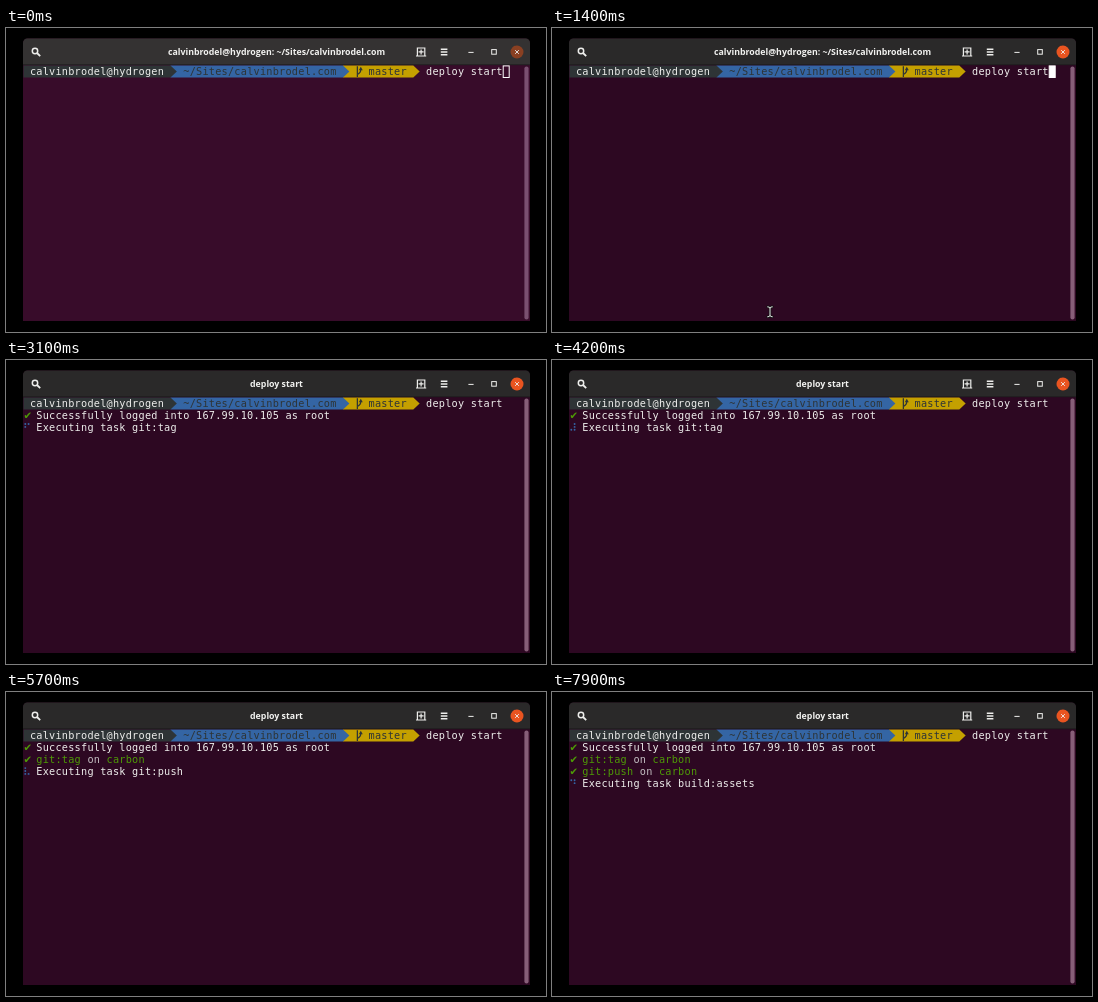
These frames come from a looping animation (540 px wide and 304 px high, 8000 ms). An HTML page:

```html
<!DOCTYPE html>
<html lang="en">
<head>
<meta charset="utf-8">
<title>Deploy terminal</title>
<style>
  html, body { margin: 0; width: 100%; height: 100%; overflow: hidden; background: #000; }
  svg { display: block; width: 100vw; height: 100vh; }
  .mono { font: 10.22px "DejaVu Sans Mono", monospace; letter-spacing: .237px; white-space: pre; }
  .title { font: bold 8.8px "Open Sans", "Noto Sans", sans-serif; text-anchor: middle; fill: #f2f2f0; }
  .icon { fill: none; stroke: #eeeeec; stroke-width: 1.2; }
</style>
</head>
<body>
<svg id="stage" viewBox="0 0 540 304">
  <defs>
    <clipPath id="frame"><path d="M17 293V15a4.5 4.5 0 0 1 4.5-4.5h498a4.5 4.5 0 0 1 4.5 4.5V293Z"/></clipPath>
  </defs>
  <rect width="540" height="304"/>
  <g clip-path="url(#frame)">
    <rect id="back" x="17" y="10" width="507" height="283"/>
    <rect id="head" x="17" y="10" width="507" height="27"/>
    <rect x="17" y="36.4" width="507" height=".8" fill="#1c1a1b"/>
    <rect id="bar" x="518.4" y="38.5" width="4.2" height="253" rx="2.1"/>
    <text id="title" class="title" x="270.5" y="27.1"></text>
    <g class="icon">
      <circle cx="29" cy="23" r="2.7" stroke-width="1.5"/>
      <path d="M31 25l3.2 3.2" stroke-width="1.8"/>
      <path d="M411.4 27.6V20h7.4v7.6M410 28h10.2M415.1 21.4v5M412.6 23.9h5"/>
      <path d="M434.8 21.2h6.6M434.8 24h6.6M434.8 26.8h6.6" stroke-width="1.4"/>
      <path d="M462.4 24.4h5.2" stroke-width="1"/>
      <rect x="485.7" y="21.6" width="4.6" height="4.6" stroke-width="1"/>
    </g>
    <circle id="close" cx="511" cy="24" r="6.5"/>
    <path class="icon" d="M509.1 22.1l3.8 3.8m0-3.8l-3.8 3.8" style="stroke-width:.9"/>
    <g id="prompt"></g>
    <rect id="cursor" x="497.2" y="37.9" width="6" height="11.6" stroke="#fff"/>
    <g id="log"></g>
    <g id="mouse" fill="none" stroke-linecap="round">
      <path id="beam" d="M-2.3-5Q0-5 0-3.6Q0-5 2.3-5M0-3.6V3.6M-2.3 5Q0 5 0 3.6Q0 5 2.3 5" stroke="#111" stroke-width="2.6"/>
      <path d="M-2.3-5Q0-5 0-3.6Q0-5 2.3-5M0-3.6V3.6M-2.3 5Q0 5 0 3.6Q0 5 2.3 5" stroke="#e8e8e8" stroke-width="1"/>
    </g>
  </g>
</svg>
<script>
const LOOP = 8000, STEP = 100;
const LEFT = 17.5, TOP = 37.4, CW = 6.39, RH = 12.14;
const DARK = '#2e3436', BLUE = '#3465a4', GOLD = '#c4a000', GREEN = '#4e9a06', WHITE = '#eeeeec', GREY = '#c3bfc2';
const USER = 'calvinbrodel';
const HOME = `${USER}@hydrogen`, SITE = `~/Sites/${USER}.com`;
const FOCUS = 1300, ENTER = 2500;
const TASKS = [
  { name: 'git:tag', at: 3060 },
  { name: 'git:push', at: 5100 },
  { name: 'build:assets', at: 6200 }
];
// Braille patterns as bit masks: dots 1-3 run down the left, 4-6 down the right
const SPIN = [...'⠋⠙⠹⠸⠼⠴⠦⠧⠇⠏'].map(c => c.charCodeAt(0) - 0x2800);

const $ = id => document.getElementById(id);
const colX = c => LEFT + c * CW;
const rowY = r => TOP + r * RH;
const set = (el, attrs) => { for (const k in attrs) el.setAttribute(k, attrs[k]); };
const mix = (a, b, k) => `rgb(${a.map((v, i) => Math.round(v + (b[i] - v) * k))})`;

const text = (col, row, str, fill) =>
  `<text class="mono" x="${colX(col)}" y="${rowY(row) + 9.5}" fill="${fill}">${str}</text>`;

const check = row =>
  `<text x="${LEFT}" y="${rowY(row) + 9.4}" fill="${GREEN}" style="font:10.2px 'DejaVu Sans',sans-serif">✔</text>`;

function spinner(row, age) {
  const mask = SPIN[Math.floor(age / 80) % SPIN.length];
  let out = '';
  for (let i = 0; i < 6; i++) {
    if (mask >> i & 1) {
      const x = LEFT + (i < 3 ? 1.8 : 5.1), y = rowY(row) + 2.3 + (i % 3) * 2.9;
      out += `<circle cx="${x}" cy="${y}" r=".95" fill="${BLUE}"/>`;
    }
  }
  return out;
}

// Powerline segment: a filled band that ends in a one-cell arrow
function segment(from, to, fill) {
  const y = rowY(0), x = colX(to);
  return `<path d="M${colX(from)} ${y}H${x}l${CW} ${RH / 2}L${x} ${y + RH}H${colX(from)}Z" fill="${fill}"/>`;
}

function drawPrompt() {
  const bx = colX(52);
  $('prompt').innerHTML =
    segment(50, 61, GOLD) + segment(23, 50, BLUE) + segment(0, 23, DARK) +
    text(1, 0, HOME, WHITE) + text(25, 0, SITE, DARK) + text(54, 0, 'master', DARK) +
    `<path d="M${bx + 1.6} 38.2V49M${bx + 1.6} 46.4Q${bx + 5} 45 ${bx + 5} 41.5" fill="none" stroke="${DARK}" stroke-width="1.3"/>` +
    `<path d="M${bx + 3} 42.2l2-3.4 2 3.4Z" fill="${DARK}"/>` +
    text(63, 0, 'deploy start', WHITE);
}

function logLines(t) {
  if (t < ENTER) return '';
  if (t < TASKS[0].at) return spinner(1, t - ENTER);
  let out = check(1) + text(2, 1, 'Successfully logged into 167.99.10.105 as root', WHITE);
  TASKS.forEach(({ name, at }, i) => {
    if (t < at) return;
    const row = i + 2, next = TASKS[i + 1], end = 2 + name.length;
    if (next && t >= next.at) {
      out += check(row) + text(2, row, name, GREEN) +
        text(end + 1, row, 'on', GREY) + text(end + 4, row, 'carbon', GREEN);
    } else {
      out += spinner(row, t - at) + text(2, row, 'Executing task ' + name, WHITE);
    }
  });
  return out;
}

// Window tint settles at the start, then again on focus
function tint(t) {
  if (t < FOCUS) return Math.max(.5, 1 - t / 400);
  return t < FOCUS + 100 ? .25 : 0;
}

function draw(t) {
  const k = tint(t), focused = t >= FOCUS;
  $('back').setAttribute('fill', mix([45, 8, 34], [56, 12, 42], k));
  $('head').setAttribute('fill', mix([42, 41, 41], [52, 50, 50], k));
  $('bar').setAttribute('fill', mix([134, 94, 120], [122, 80, 112], k));
  $('close').setAttribute('fill', focused ? '#e95420' : '#8a4022');
  $('title').textContent = t < ENTER ? `${HOME}: ${SITE}` : 'deploy start';

  const lit = t < 1900 || (t >= 2400 && t < ENTER);
  set($('cursor'), { visibility: lit ? 'visible' : 'hidden', fill: focused ? '#fff' : 'none' });

  const p = Math.min(1, Math.max(0, (t - 800) / 500)), ease = 1 - (1 - p) ** 2;
  set($('mouse'), {
    visibility: t >= 900 && t < 2400 ? 'visible' : 'hidden',
    transform: `translate(${224 - 6 * ease} ${300 - 16.2 * ease})`
  });
  $('log').innerHTML = logLines(t);
}

drawPrompt();
const start = performance.now();
let last = -1;
function tick() {
  const t = Math.floor((performance.now() - start) % LOOP / STEP) * STEP;
  if (t !== last) draw(last = t);
  requestAnimationFrame(tick);
}
tick();
</script>
</body>
</html>
```
